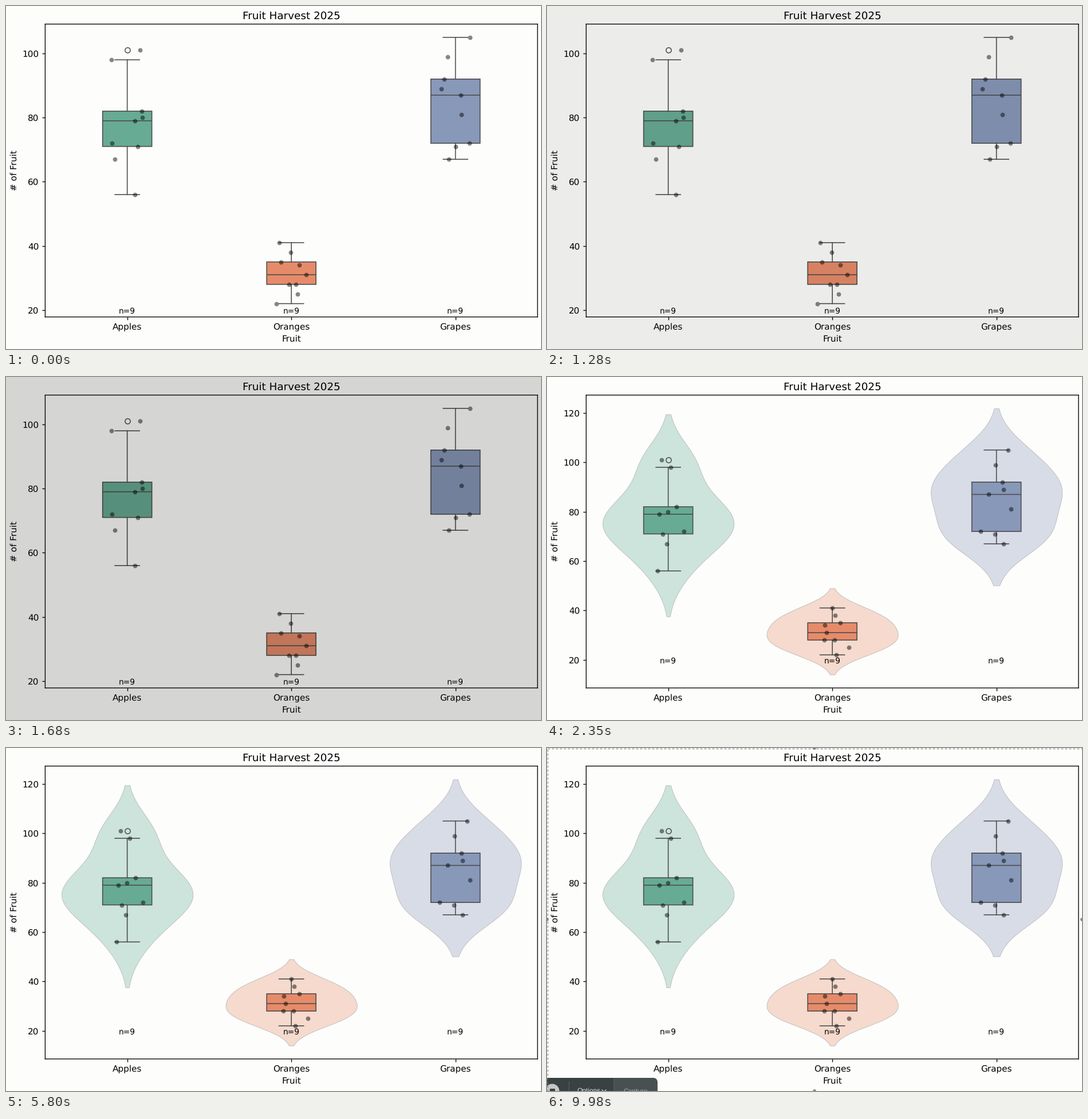
A matplotlib script for the animation above (10000 ms loop, 934x600 px).

```python
import numpy as np
import matplotlib.pyplot as plt
from matplotlib.animation import FuncAnimation
from matplotlib.patches import Circle, FancyBboxPatch, Rectangle

W, H, DPI = 934, 600, 64
LOOP_MS, STEP_MS = 10000, 50
DIM_START, DIM_END, SWAP, SELECT = 540, 1680, 2250, 9500
LEFT, TOP, RIGHT, BOTTOM = 68.4, 31.6, 927.9, 543.9
UNIT = (RIGHT - LEFT) / 3

PAPER = "#fdfdfc"
INK = "#4c4c4c"
FRUITS = ["Apples", "Oranges", "Grapes"]
FILLS = ["#67ab94", "#e68b6a", "#8898b9"]
PALE = ["#cce4db", "#f5dacd", "#d8dce7"]
HARVEST = [
    [56, 67, 71, 72, 79, 80, 82, 98, 101],
    [22, 25, 28, 28, 31, 34, 35, 38, 41],
    [67, 71, 72, 81, 87, 89, 92, 99, 105],
]

# Sideways jitter of the dots, in pixels.
JITTER_BOX = [
    [13.5, -21.5, 18, -26.5, 13, 26.5, 25.5, -27.5, 22.5],
    [-26, 11, -4.5, 8, 26, 13.5, -18, -1.5, -21],
    [-12, 0, 24, 10.5, 9, -24.5, -19.5, -14, 25.5],
]
JITTER_VIOLIN = [
    [-19, -2.5, -10, 27.5, -15.5, -1, 14, 4, -12],
    [7, 28.5, -14.5, 4, -10, -13, 14, 4.5, -0.5],
    [12, -3, -28, 25.5, -13.5, 12.5, 10.5, -2, 20.5],
]


def px(v):
    """Pixels to points."""
    return v * 72 / DPI


plt.rcParams.update({
    "font.family": "DejaVu Sans",
    "font.size": px(15.3),
    "text.hinting": "none",
    "axes.linewidth": px(1.35),
    "axes.titlesize": px(18.35),
    "axes.titlepad": px(9.2),
    "axes.labelpad": px(6.5),
})

fig = plt.figure(figsize=(W / DPI, H / DPI), dpi=DPI, facecolor=PAPER)


def density(values):
    """Gaussian density, cut two bandwidths beyond the data."""
    values = np.array(values, float)
    bw = values.std(ddof=1) * len(values) ** -0.2
    ys = np.linspace(values.min() - 2 * bw, values.max() + 2 * bw, 100)
    d = np.exp(-0.5 * ((ys[:, None] - values) / bw) ** 2).sum(axis=1)
    return ys, d / d.max()


def make_chart(jitter, violins):
    ax = fig.add_axes([LEFT / W, 1 - BOTTOM / H, (RIGHT - LEFT) / W,
                       (BOTTOM - TOP) / H], facecolor=PAPER)
    low, high = min(map(min, HARVEST)), max(map(max, HARVEST))

    if violins:
        for i, values in enumerate(HARVEST):
            ys, d = density(values)
            ax.fill_betweenx(ys, i - 0.4 * d, i + 0.4 * d, facecolor=PALE[i],
                             edgecolor="#bcbcbc", linewidth=px(0.9), zorder=1)
            low, high = min(low, ys[0]), max(high, ys[-1])

    line = dict(color=INK, linewidth=px(1.6))
    parts = ax.boxplot(
        HARVEST, positions=range(3), widths=0.3, patch_artist=True,
        manage_ticks=False, whiskerprops=line, capprops=line,
        medianprops=line, boxprops=dict(edgecolor=INK, linewidth=px(1.6)),
        flierprops=dict(marker="o", markersize=px(9.2),
                        markerfacecolor="none", markeredgecolor=INK,
                        markeredgewidth=px(1.5)))
    for box, fill in zip(parts["boxes"], FILLS):
        box.set_facecolor(fill)

    for i, values in enumerate(HARVEST):
        ax.scatter(i + np.array(jitter[i]) / UNIT, values, s=px(7.8) ** 2,
                   color="black", alpha=0.47, linewidths=0, zorder=3)
        ax.annotate("n=9", (i, 19.7), xytext=(0, px(-4.6)),
                    textcoords="offset points", ha="center", va="baseline",
                    fontsize=px(13.75), zorder=4)

    pad = 0.05 * (high - low)
    ax.set_xlim(-0.5, 2.5)
    ax.set_ylim(low - pad, high + pad)
    ax.set_xticks(range(3), FRUITS)
    ax.set_yticks(range(20, int(high + pad) + 1, 20))
    ax.tick_params(length=px(5.4), width=px(1.35), pad=px(5.4))
    ax.set_title("Fruit Harvest 2025")
    ax.set_xlabel("Fruit")
    ax.set_ylabel("# of Fruit")

    # Soft lines at their true positions, not pulled to the pixel grid.
    for artist in ax.findobj():
        artist.set_snap(False)
    return ax


def make_layer(zorder):
    """Transparent axes in pixels, with y pointing down."""
    ax = fig.add_axes([0, 0, 1, 1], zorder=zorder)
    ax.set_xlim(0, W)
    ax.set_ylim(H, 0)
    ax.axis("off")
    return ax


def make_toolbar(ax):
    bar = FancyBboxPatch((-20, 577), 213, 60, facecolor="#495051",
                         edgecolor="none",
                         boxstyle="round,pad=0,rounding_size=8")
    shapes = [
        bar,
        Rectangle((0, 577), 116, 23, facecolor="#3a4142"),
        Rectangle((37.5, 583), 1, 17, facecolor="#596061"),
        Rectangle((115.5, 577), 1, 23, facecolor="#545b5c"),
        Circle((9, 600), 12.5, facecolor="#c3c7c7"),
        Rectangle((4.5, 595.5), 9, 9, facecolor="#3a4142"),
    ]
    for shape in shapes:
        ax.add_patch(shape)
    style = dict(family="Liberation Sans", fontsize=px(12), va="baseline",
                 clip_on=True)
    texts = [ax.text(52, 604, "Options", color="#d3d6d6", **style),
             ax.text(133, 604, "Capture", color="#a5aaaa", **style)]
    chevron = ax.plot([96, 99.5, 103], [598, 601.5, 598], color="#d3d6d6",
                      linewidth=px(1.3))
    return shapes + texts + chevron


box_chart = make_chart(JITTER_BOX, False)
violin_chart = make_chart(JITTER_VIOLIN, True)

shade_layer = make_layer(5)
shade = shade_layer.add_patch(Rectangle((0, 0), W, H, facecolor="black",
                                        edgecolor="none", alpha=0))

select_layer = make_layer(6)
select_layer.plot([0.5, W - 0.5, W - 0.5, 0.5, 0.5],
                  [0.5, 0.5, H - 0.5, H - 0.5, 0.5],
                  color="#777777", linewidth=px(1), dashes=(4, 3))
for spot in [(W / 2, 0), (W / 2, H), (0, H / 2), (W, H / 2)]:
    select_layer.add_patch(Circle(spot, 3, facecolor="#8a8a8a"))
toolbar = make_toolbar(select_layer)


def draw(i):
    t = i * STEP_MS
    box_chart.set_visible(t < SWAP)
    violin_chart.set_visible(t >= SWAP)

    # The old chart dims with an ease-in, then the new one replaces it at once.
    dim = np.clip((t - DIM_START) / (DIM_END - DIM_START), 0, 1)
    shade.set_alpha(0.163 * dim ** 1.85)
    shade_layer.set_visible(DIM_START < t < SWAP)

    select_layer.set_visible(t >= SELECT)
    fade = float(np.clip((t - SELECT) / 300, 0, 1))
    for artist in toolbar:
        artist.set_alpha(fade)
    return []


anim = FuncAnimation(fig, draw, frames=LOOP_MS // STEP_MS, init_func=lambda: [],
                     interval=STEP_MS, repeat=True, repeat_delay=0)
plt.show()
```
